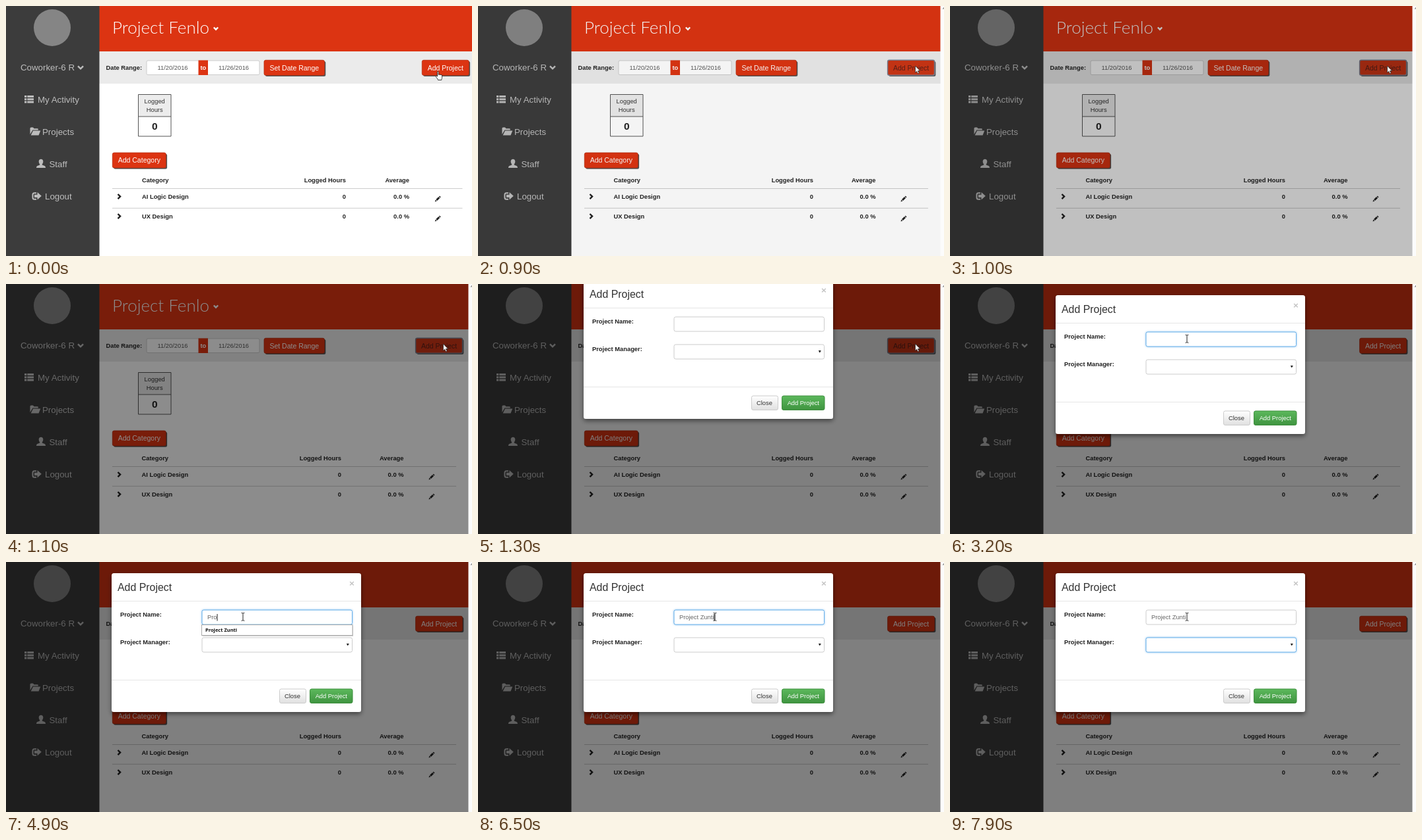
Write an HTML page that moves like this. It is 706 px wide and 380 px high and loops after 8 s.

```html
<!DOCTYPE html>
<html lang="en">
<head>
<meta charset="utf-8">
<title>Add project dialog</title>
<style>
html, body { margin: 0; width: 100%; height: 100%; overflow: hidden; background: #fff; }
svg { display: block; width: 706px; height: 380px; font: 9.35px "Liberation Sans", Arial, sans-serif; fill: #333; }
.b { font-weight: 700; fill: #222; }
.nav { font-size: 13.3px; fill: #bdbdbd; }
.icon { fill: #bdbdbd; }
.btn { font-size: 10.5px; fill: #fff; text-anchor: middle; }
.end { text-anchor: end; }
.mid { text-anchor: middle; }
.line { fill: none; stroke: #ccc; }
.field { fill: #fff; stroke: #ccc; }
.chev { fill: none; stroke-width: 2.4; }
</style>
</head>
<body>
<svg viewBox="0 0 706 380" xmlns="http://www.w3.org/2000/svg">
  <defs>
    <linearGradient id="grey" x2="0" y2="1"><stop stop-color="#fff"/><stop offset="1" stop-color="#e0e0e0"/></linearGradient>
    <linearGradient id="green" x2="0" y2="1"><stop stop-color="#5cb85c"/><stop offset="1" stop-color="#3f9440"/></linearGradient>
    <filter id="drop" x="-10%" y="-10%" width="120%" height="125%"><feDropShadow dx="0" dy="3" stdDeviation="3.5" flood-opacity=".5"/></filter>
    <filter id="glow" x="-5%" y="-40%" width="110%" height="180%"><feGaussianBlur stdDeviation="1.8"/></filter>
    <g id="pencil" fill="#222"><path d="M0 8.5l.9-2.9 2 2zM1.5 5l4-4 2 2-4 4zM6.1.4l.6-.5q.5-.3 1 .1l.9.9q.4.5 0 1l-.6.5z"/></g>
    <path id="right" class="chev" stroke="#222" d="M0 0l3.6 3.6L0 7.2"/>
  </defs>

  <rect width="706" height="380" fill="#fff"/>
  <rect x="141" width="565" height="69" fill="#dc3412"/>
  <rect x="141" y="69" width="565" height="49" fill="#ebebeb"/>
  <rect width="141.5" height="380" fill="#3c3c3c"/>
  <circle cx="70" cy="33" r="28" fill="#858585"/>

  <g class="nav">
    <text x="22" y="98">Coworker-6 R</text>
    <text x="48" y="147">My Activity</text>
    <text x="55" y="196">Projects</text>
    <text x="65.5" y="245">Staff</text>
    <text x="59" y="294">Logout</text>
  </g>
  <path class="chev" stroke="#bdbdbd" stroke-width="3" d="M109 91.3l4 4 4-4"/>
  <g class="icon">
    <path d="M28 136h3.3v3H28zM32.3 136h9.7v3h-9.7zM28 140.3h3.3v3H28zM32.3 140.3h9.7v3h-9.7zM28 144.6h3.3v3H28zM32.3 144.6h9.7v3h-9.7z"/>
    <path d="M36.5 195v-9q0-1.5 1.5-1.5h3l1.5 1.7h5q1.3 0 1.3 1.3v1H40.500zM37.700 196.500l3.400-7h11.200l-2.800 7z"/>
    <path d="M53 232.800c2.400 0 3.500 1.700 3.300 4-.2 2-.9 3-1.500 3.700-.3 1 .4 1.300 1.700 1.800 2.300.8 3.500 1.400 3.500 3.700H46c0-2.300 1.200-2.900 3.500-3.700 1.300-.5 2-.8 1.700-1.800-.6-.7-1.300-1.700-1.500-3.700-.2-2.300.9-4 3.300-4z"/>
    <path d="M47.500 285.200v-2.200l6.300 5.800-6.300 5.800V291h-4.500v-4.300h4.500z"/>
    <path d="M46 284.200h-3q-2.500 0-2.500 2.500v4.500q0 2.500 2.500 2.500h3" fill="none" stroke="#bdbdbd" stroke-width="2"/>
  </g>

  <text x="161" y="42" style="font:300 26px Lato, sans-serif;fill:#fff">Project Fenlo</text>
  <path class="chev" stroke="#fff" stroke-width="2" d="M314.800 32.500l3.200 3.200 3.200-3.200"/>

  <text class="b" x="151.500" y="97">Date Range:</text>
  <rect class="field" x="213" y="83" width="171" height="21.500" rx="2"/>
  <rect x="291.500" y="82.500" width="14.500" height="22.500" fill="#dc3412"/>
  <text class="mid" x="252.500" y="97" fill="#555">11/20/2016</text>
  <text class="mid b" x="298.800" y="97" style="fill:#fff">to</text>
  <text class="mid" x="345" y="97" fill="#555">11/26/2016</text>
  <g id="buttons"></g>

  <rect x="200.500" y="134.500" width="49.500" height="63.500" fill="#fff"/>
  <rect x="200.500" y="134.500" width="49.500" height="33.500" fill="#ececec"/>
  <path d="M200.500 134.500h49.500v63.500h-49.500zM200.500 168h49.500" fill="none" stroke="#555"/>
  <text class="mid" x="225.200" y="148">Logged</text>
  <text class="mid" x="225.200" y="161.300">Hours</text>
  <text class="mid b" x="225.200" y="188" style="font-size:15.500px">0</text>

  <g id="table" class="b"></g>

  <rect id="shade" width="706" height="380" fill="#000"/>
  <g id="bar">
    <rect x="700.500" width="5.500" height="380" fill="#fcfcfc"/>
    <path d="M703.500 4.500l2.500-2.800v2.800z" fill="#888"/>
  </g>

  <g id="modal">
    <rect x="160" y="17" width="378" height="211" rx="3.500" fill="#fff" filter="url(#drop)"/>
    <path d="M160 59.500h378M160 179.500h378" stroke="#e5e5e5"/>
    <text x="169" y="43.500" style="font-size:15.900px">Add Project</text>
    <text class="mid b" x="524" y="36.500" style="font-size:13.500px;fill:#c4c4c4">×</text>
    <text class="b" x="173" y="82.500">Project Name:</text>
    <text class="b" x="173" y="124.500">Project Manager:</text>
    <g id="name"></g>
    <g id="manager"></g>
    <path d="M515.800 124h4l-2 3.600z" fill="#222"/>
    <text id="typed" x="305" y="87.200" fill="#666"></text>
    <rect id="caret" y="79" width="1" height="10.500" fill="#222"/>
    <rect x="414.500" y="193" width="40" height="21.500" rx="2.500" fill="url(#grey)" stroke="#ccc"/>
    <text class="mid" x="434" y="207">Close</text>
    <rect x="460.500" y="193" width="64.500" height="21.500" rx="2.500" fill="url(#green)" stroke="#3e8f3e"/>
    <text class="mid" x="492.800" y="207" fill="#fff">Add Project</text>
    <g id="menu">
      <rect x="297.500" y="97" width="228.500" height="16" fill="#000" opacity=".18"/>
      <rect x="296.500" y="95.500" width="228.500" height="16" fill="#fff" stroke="#aaa"/>
      <rect id="pick" x="297" y="96" width="227.500" height="15" fill="#3390ff"/>
      <text id="option" x="302" y="106.300" style="font:700 7.500px 'Open Sans', sans-serif">Project Zunti</text>
    </g>
  </g>

  <path id="arrow" d="M0 0v10.300l2.300-2.100 1.600 3.600 1.700-.8-1.600-3.500h3.200z" fill="#fff" stroke="#222" stroke-width=".7"/>
  <path id="hand" d="M0 .8c0-1.300 1.800-1.300 1.800 0v4.200c.3-.8 1.600-.7 1.800.2.300-.7 1.600-.6 1.800.3.300-.6 1.700-.5 1.700.6v3.200c0 1.200-.8 1.900-.8 3.700H1C.8 11.300-1.300 9.700-2.300 7.500c-.5-1.200.7-1.700 1.400-.9L0 7.700z" fill="#fff" stroke="#111" stroke-width=".8"/>
  <path id="beam" d="M-2.300-6q1.800 0 2.300 1 .5-1 2.300-1M0-5V5M-2.300 6q1.800 0 2.300-1 .5 1 2.300 1" fill="none" stroke="#222"/>
</svg>
<script>
const $ = id => document.getElementById(id);
const set = (el, attrs) => { for (const k in attrs) el.setAttribute(k, attrs[k]); };
const show = (id, on) => set($(id), { visibility: on ? 'visible' : 'hidden' });
const clamp = x => Math.min(1, Math.max(0, x));
const span = (t, from, to) => clamp((t - from) / (to - from));
const easeOut = x => 1 - (1 - x) ** 2;
const smooth = x => x * x * (3 - 2 * x);
const mix = (a, b, p) => a + (b - a) * p;

const LOOP = 8000, FULL = 'Project Zunti';
const OPEN = 800, MOVE = 1800, CLICK = 2660, TYPE = 4600, PICK = 5500, FILL = 6000, TAB = 7000;

const button = (id, x, y, w, label) => `<g id="${id}">
  <rect x="${x + 1.8}" y="${y + 1.8}" width="${w}" height="23" rx="2.500" fill="#555"/>
  <rect class="face" x="${x}" y="${y}" width="${w}" height="23" rx="2.500" fill="#dc3412" stroke="#b92c10" stroke-width=".8"/>
  <text class="btn" x="${x + w / 2}" y="${y + 15.2}">${label}</text></g>`;
$('buttons').innerHTML = button('range', 391, 82.3, 91.5, 'Set Date Range')
  + button('add', 630.3, 82.3, 71, 'Add Project')
  + button('cat', 161.3, 223, 81, 'Add Category');

// data-s: how far the part moves left when the scrollbar appears
const cells = (y, a, b, c) => `<text x="206" y="${y}" data-s=".5">${a}</text>
  <text class="end" x="515" y="${y}" data-s="7">${b}</text>
  <text class="end" x="611" y="${y}" data-s="8.5">${c}</text>`;
const row = (y, a) => cells(y, a, 0, '0.0 %')
  + `<use href="#right" x="169.500" y="${y - 7}"/><g data-s="9.300"><use href="#pencil" x="649.800" y="${y - 4}"/></g>`;
$('table').innerHTML = cells(268, 'Category', 'Logged Hours', 'Average')
  + row(293, 'AI Logic Design') + row(323, 'UX Design')
  + '<path id="rules" class="line"/>';
const movers = [...document.querySelectorAll('[data-s]')];

const field = y => `<rect class="halo" x="296.500" y="${y - .5}" width="228.500" height="23" rx="3" fill="#66afe9" filter="url(#glow)"/>
  <rect class="box" x="297" y="${y}" width="227.500" height="22" rx="2.500" fill="#fff"/>`;
$('name').innerHTML = field(73);
$('manager').innerHTML = field(115);

function focus(id, p) {
  set($(id).querySelector('.halo'), { opacity: p * .75 });
  const c = [[204, 102], [204, 175], [204, 233]].map(([a, b]) => Math.round(mix(a, b, p)));
  set($(id).querySelector('.box'), { stroke: `rgb(${c})` });
}

function textAt(t) {
  if (t >= FILL) return FULL;
  return t < TYPE ? '' : FULL.slice(0, Math.min(3, 1 + Math.floor((t - TYPE) / 130)));
}

function caretOn(t) {
  if (t < CLICK || t >= TAB) return false;
  const start = t >= FILL ? FILL : t >= TYPE + 260 ? TYPE + 260 : t >= TYPE ? TYPE : CLICK;
  return (t - start) % 1060 < 530;
}

function draw(t) {
  const shift = t >= OPEN ? 1 : 0;
  movers.forEach(el => set(el, { transform: `translate(${-el.dataset.s * shift})` }));
  const right = 691.5 - 9.5 * shift;
  set($('rules'), { d: `M161 277.500H${right}M161 307.300H${right}` });

  const hot = t >= 200 && t < MOVE, held = hot && shift;
  set($('add'), { transform: `translate(${-9.7 * shift})` });
  set($('add').querySelector('.face'), { fill: held ? '#cb3515' : '#dc3412', stroke: held ? '#7c7f90' : '#b92c10', 'stroke-width': held ? 1.5 : .8 });
  $('add').querySelector('text').style.fill = hot ? '#5a2018' : '#fff';

  set($('shade'), { opacity: .5 * span(t, 880, 1125) });
  show('bar', shift);

  const slide = easeOut(span(t, 1150, 1570));
  set($('modal'), { transform: `translate(0 ${-56 * (1 - slide)})`, opacity: span(t, 1150, 1290) });

  focus('name', span(t, CLICK, CLICK + 150) - span(t, TAB, TAB + 150));
  focus('manager', span(t, TAB, TAB + 150));
  $('typed').textContent = textAt(t);
  set($('caret'), { x: 305 + (textAt(t) ? $('typed').getComputedTextLength() : 0), opacity: caretOn(t) ? 1 : 0 });

  const open = t >= TYPE && t < FILL, picked = open && t >= PICK;
  show('menu', open);
  show('pick', picked);
  set($('option'), { fill: picked ? '#fff' : '#111' });

  const near = smooth(span(t, 100, 400)), go = smooth(span(t, MOVE, 2620));
  const x = mix(mix(653.5, 662.5, near), 359, go), y = mix(mix(99.5, 91, near), 83.3, go);
  const overField = x > 297 && x < 524.5 && go > 0;
  show('hand', !shift);
  show('arrow', shift && !overField);
  show('beam', overField);
  ['hand', 'arrow', 'beam'].forEach(id => set($(id), { transform: `translate(${x} ${y})` }));
}

const began = performance.now();
function tick() {
  draw((performance.now() - began) % LOOP);
  requestAnimationFrame(tick);
}
tick();
</script>
</body>
</html>
```
